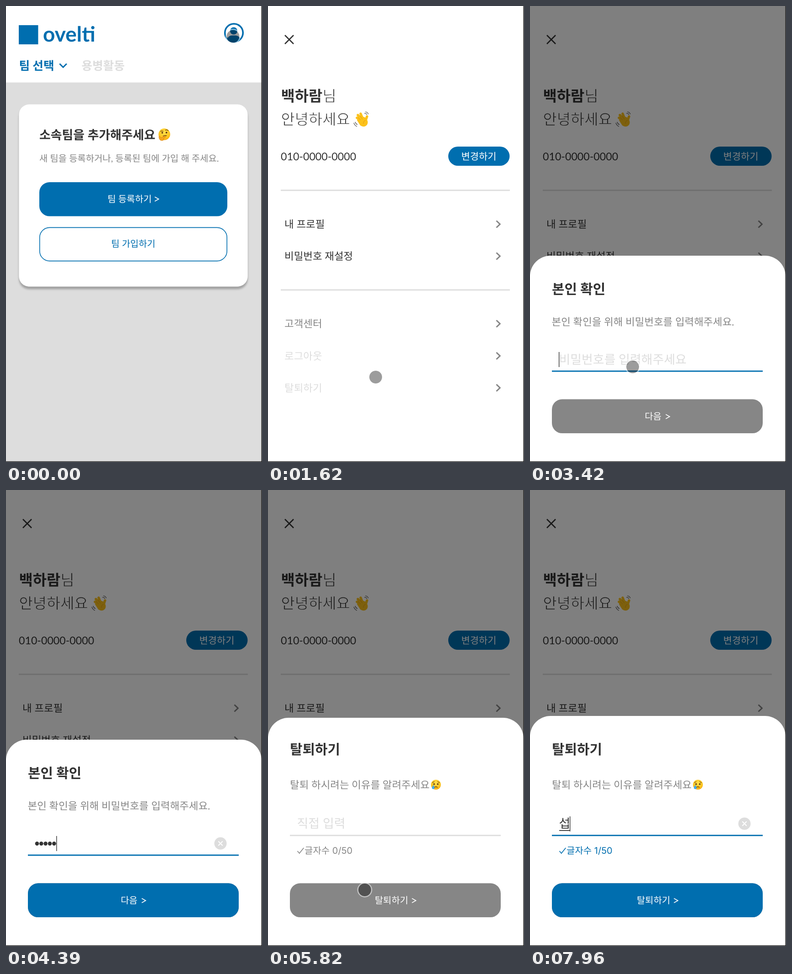
An HTML page that plays this animation: 561 by 999 pixels, repeating every 8000 ms.

```html
<!DOCTYPE html>
<html lang="ko">
<head>
<meta charset="utf-8">
<style>
  html, body { margin: 0; width: 100%; height: 100%; overflow: hidden; background: #fff; }
  svg { display: block; width: 561px; height: 999px; }
  text { font-family: Lato, "Noto Sans CJK KR", "Noto Sans CJK", sans-serif; text-rendering: geometricPrecision; }
  .count { font-family: Inter, "Noto Sans CJK KR", "Noto Sans CJK", sans-serif; }
  .thin { stroke: #fff; stroke-width: .9px; }
  .line { fill: none; stroke-linecap: butt; stroke-linejoin: miter; }
</style>
</head>
<body>
<svg id="stage" viewBox="0 0 561 999" xmlns="http://www.w3.org/2000/svg"></svg>
<script>
const LOOP = 8000;
const BLUE = '#006eaf', DARK = '#333', GREY = '#868686', PALE = '#ddd';

// ---- markup helpers ----
const text = (x, y, size, fill, str, extra = '') =>
  `<text x="${x}" y="${y}" font-size="${size}" fill="${fill}" ${extra}>${str}</text>`;
const rect = (x, y, w, h, fill, rx = 0, extra = '') =>
  `<rect x="${x}" y="${y}" width="${w}" height="${h}" rx="${rx}" fill="${fill}" ${extra}/>`;
const circle = (x, y, r, fill, extra = '') =>
  `<circle cx="${x}" cy="${y}" r="${r}" fill="${fill}" ${extra}/>`;
const line = (d, color, width, extra = '') =>
  `<path class="line" d="${d}" stroke="${color}" stroke-width="${width}" ${extra}/>`;
const group = (id, body) => `<g id="${id}">${body}</g>`;
const BOLD = 'font-weight="700"', THIN = 'class="thin"', MID = 'text-anchor="middle"';
const arrow = (x, y, color) => line(`M${x} ${y - 4.7}l8.6 4.7l-8.6 4.7`, color, 1.6);

// ---- emoji ----
const face = r => circle(0, 0, r, 'url(#sun)');
const thinking = `<g transform="translate(347 281)">${face(12.8)}
  ${circle(-4.5, -3.2, 1.8, '#5b3411')}${circle(4.6, -3.6, 1.8, '#5b3411')}
  ${line('M-8.5 -6.2Q-5.5 -8 -2.2 -6.4M2 -8.6Q5.5 -11 9 -7.8', '#6b3d12', 1.4)}
  ${line('M-3 4.2Q1 1.8 5 3.2', '#6b3d12', 1.5)}
  <path d="M-12 5.5Q-11 2.8 -9.4 5L-8 8L1 4.6Q4 4.6 2 7L-2 9Q0 13.4 -5 13.8Q-11.5 14 -12 5.5Z"
    fill="#f5a623" stroke="#d9820f" stroke-width=".8"/></g>`;
const crying = `<g transform="translate(368 645.5)">${face(10.8)}
  ${circle(-4, -1.2, 1.7, '#5b3411')}${circle(4, -1.2, 1.7, '#5b3411')}
  ${line('M-8 -4.4Q-5 -5 -3.4 -7M8 -4.4Q5 -5 3.4 -7', '#6b3d12', 1.2)}
  ${line('M-3.4 6.4Q0 2.6 3.4 6.4', '#6b3d12', 1.5)}
  <path d="M-5.6 .8Q-9.4 6 -8.6 8.2Q-6 11.4 -3 8.2Q-2.4 6 -5.6 .8Z" fill="#3fa9f0"/></g>`;
const waving = `<g transform="translate(205 249)">
  ${line('M2 4L-10 -4M2 3L-8 -10M4 2L-2 -13M8 5L12 -7', '#fcc21b', 5.4, 'style="stroke-linecap:round"')}
  <path d="M-9 1L2 -6L9 -3Q15 5 11 11Q5 17 -2 12Z" fill="#fcc21b" stroke="#fcc21b" stroke-width="2" stroke-linejoin="round"/>
  ${line('M-8 -5L-2 1M-4 -9L2 -1M4 9Q4 3 9 1', '#e59a12', 1)}
  ${line('M6 -14Q10 -14 12 -11M8 -17Q13 -17 15 -12M-14 5Q-13 9 -9 11M-17 7Q-15 13 -10 15', '#555', 1.2)}</g>`;

// ---- screens ----
const home = rect(0, 0, 561, 999, PALE) + rect(0, 0, 561, 167.5, '#fff') +
  rect(28, 42, 42.5, 42, BLUE) + text(81, 78, 46, BLUE, 'ovelti', BOLD) +
  circle(499.5, 58.8, 19.8, '#fff', `stroke="${BLUE}" stroke-width="3.6"`) +
  circle(499, 54.5, 8, BLUE) +
  `<path d="M485.5 71Q488 65 495 64.6H503Q510.5 65 513 71Q507 78 499.5 78T485.5 71Z" fill="${BLUE}"/>` +
  text(28.5, 139.6, 25.7, BLUE, '팀 선택', BOLD) + line('M117.5 126.5l7.7 7.7l7.7 -7.7', BLUE, 3) +
  text(165.5, 139.6, 25.7, PALE, '용병활동', BOLD) +
  rect(28.5, 215.5, 501, 399, '#fff', 22.4, 'filter="url(#shade)"') +
  text(73, 292, 26.95, DARK, '소속팀을 추가해주세요', BOLD) + thinking +
  text(73, 341.4, 19.95, GREY, '새 팀을 등록하거나, 등록된 팀에 가입 해 주세요.') +
  rect(73, 386, 412, 74.6, BLUE, 22.4) + text(222.5, 429.6, 19.95, '#fff', '팀 등록하기') + arrow(326, 423, '#fff') +
  rect(73.8, 485.4, 410.4, 73.2, '#fff', 21.7, `stroke="${BLUE}" stroke-width="1.6"`) +
  text(279, 528.4, 19.95, BLUE, '팀 가입하기', MID);

const entry = (label, y, color) =>
  text(36, y + 8.4, 22.44, color, label) + line(`M500.5 ${y - 7.5}l7.8 7.5l-7.8 7.5`, GREY, 3);
const menu = rect(0, 0, 561, 999, '#fff') +
  line('M37 64L56 83M56 64L37 83', DARK, 2.6) +
  text(28.5, 209.4, 32.9, DARK, '백하람', BOLD) + text(119.5, 209.4, 32.9, DARK, '님', THIN) +
  text(28.5, 260.2, 32.9, DARK, '안녕하세요', THIN) + waving +
  text(28, 338, 23.2, DARK, '010-0000-0000') +
  rect(395, 308, 134.5, 42, BLUE, 21) + text(462, 336.6, 20.94, '#fff', '변경하기', MID) +
  rect(28, 402.4, 502, 2.8, PALE) + rect(28, 620.6, 502, 2.8, PALE) +
  entry('내 프로필', 478, DARK) + entry('비밀번호 재설정', 548, DARK) +
  entry('고객센터', 696, GREY) + entry('로그아웃', 766.5, PALE) + entry('탈퇴하기', 836.5, PALE);

const panel = (id, top) => rect(0, top, 560, 700, '#fff', 45, `id="${id}"`);
const button = (id, label, x, arrowX) =>
  rect(48, 861.5, 462, 74.6, GREY, 22.4) + rect(48, 861.5, 462, 74.6, BLUE, 22.4, `id="${id}"`) +
  text(x, 906.4, 19.95, '#fff', label) + arrow(arrowX, 899.5, '#fff');
const clear = (id, y) => group(id, circle(470, y, 13.5, PALE) +
  line(`M465.3 ${y - 4.7}l9.4 9.4m0 -9.4l-9.4 9.4`, '#fff', 2));
const caret = (id, y) => rect(63, y, 1.3, 33, '#222', 0, `id="${id}"`);
const dots = Array.from({ length: 9 }, (_, i) => circle(68 + 9.35 * i, 774.6, 4.3, DARK, 'class="dot"')).join('');

const verify = panel('panelA', 547) +
  text(48, 631.4, 29.92, DARK, '본인 확인', BOLD) +
  text(47.5, 699.8, 22.44, GREY, '본인 확인을 위해 비밀번호를 입력해주세요.') +
  text(63.5, 783.6, 26.95, PALE, '비밀번호를 입력해주세요', 'id="hintA"') +
  dots + caret('caretA', 758) + clear('clearA', 774.3) +
  rect(48, 798.6, 462, 2.8, PALE, 0, 'id="ruleA"') + button('goA', '다음', 251.5, 297.5);

const leave = panel('panelB', 495) +
  text(48, 579.4, 29.92, DARK, '탈퇴하기', BOLD) +
  text(48, 653.6, 22.44, GREY, '탈퇴 하시려는 이유를 알려주세요') + crying +
  text(63.5, 740.2, 26.95, PALE, '직접 입력', 'id="hintB"') +
  text(63.5, 740.2, 26.95, DARK, '', 'id="typed"') + rect(64, 745, 23, 1.8, DARK, 0, 'id="compose"') +
  caret('caretB', 715) + clear('clearB', 731) +
  rect(48, 755.4, 462, 2.8, PALE, 0, 'id="ruleB"') +
  group('tally', line('M64.5 791l4.3 5l9.5 -12', 'currentColor', 1.7) +
    text(80, 797.3, 20, 'currentColor', '', 'id="count" class="count"')) +
  button('goB', '탈퇴하기', 234, 315.5);

const $ = id => document.getElementById(id);
$('stage').innerHTML = `<defs>
  <radialGradient id="sun" cx=".5" cy=".35" r=".7"><stop offset="0" stop-color="#ffe14d"/>
    <stop offset=".7" stop-color="#fcc21b"/><stop offset="1" stop-color="#f09a10"/></radialGradient>
  <filter id="shade" x="-10%" y="-10%" width="120%" height="120%">
    <feDropShadow dx="0" dy="6" stdDeviation="2.2" flood-opacity=".27"/></filter></defs>` +
  home + group('menu', menu) + rect(0, 0, 561, 999, '#000', 0, 'id="dim" opacity=".5"') +
  group('verify', verify) + group('leave', leave) +
  group('cursor', circle(0, 0, 14, '#000', 'opacity=".39"') +
    circle(0, 0, 15.2, 'none', 'stroke="#fff" stroke-opacity=".5" stroke-width="2.4"')) +
  rect(559.6, 0, 1.4, 999, '#222') + rect(0, 997.6, 561, 1.4, '#222');

// ---- timing ----
const ramp = (t, a, b) => Math.min(1, Math.max(0, (t - a) / (b - a)));
const outQuart = p => 1 - (1 - p) ** 4;
const smooth = p => p * p * (3 - 2 * p);
const within = (t, a, b) => t >= a && t < b;
const show = (id, on) => { $(id).style.display = on ? '' : 'none'; };
const last = (steps, t) => steps.reduce((value, [at, next]) => t >= at ? next : value, steps[0][1]);

const route = [
  [0, 497.5, 66.5], [850, 497.5, 66.5], [1560, 236, 813], [1700, 236, 813], [2000, 237, 836],
  [2720, 237, 836], [3120, 225, 790.5], [5290, 225, 792], [5420, 214, 858], [5540, 212, 876],
  [5920, 212, 876], [6100, 210, 799], [6440, 208.5, 750.5], [LOOP, 208.5, 750.5]
];
const keys = [[0, 0], [3990, 1], [4120, 2], [4290, 3], [4370, 5], [4450, 6], [4540, 7], [4620, 9]];
const syllable = [[0, ''], [7090, 'ㅅ'], [7180, ''], [7820, 'ㅅ'], [7870, '서'], [7930, '섭']];
const SWAP = 5680;

function moveCursor(t) {
  const i = Math.max(1, route.findIndex(stop => stop[0] > t));
  const [t0, x0, y0] = route[i - 1], [t1, x1, y1] = route[i];
  const p = smooth(ramp(t, t0, t1));
  $('cursor').setAttribute('transform', `translate(${x0 + (x1 - x0) * p} ${y0 + (y1 - y0) * p})`);
  show('cursor', !within(t, 3660, 5060) && t < 7090);
}

function drawVerify(t) {
  const count = last(keys, t);
  show('verify', within(t, 2100, SWAP));
  $('verify').setAttribute('transform', `translate(0 ${452 * (1 - outQuart(ramp(t, 2100, 2468)))})`);
  document.querySelectorAll('.dot').forEach((dot, i) => { dot.style.display = i < count ? '' : 'none'; });
  show('hintA', !count);
  show('clearA', count);
  show('caretA', within(t, 3420, 4890));
  $('caretA').setAttribute('x', 63 + (count ? count * 9.35 + .5 : 0));
  $('ruleA').setAttribute('fill', t >= 3420 ? BLUE : PALE);
  $('goA').setAttribute('opacity', ramp(t, 3970, 4120));
}

function drawLeave(t) {
  const value = last(syllable, t);
  show('leave', t >= SWAP);
  $('panelB').setAttribute('y', 547 - 52 * outQuart(ramp(t, SWAP, SWAP + 300)));
  $('typed').textContent = value;
  show('hintB', !value);
  show('compose', value);
  show('clearB', value);
  show('caretB', t >= 6520 && !within(t, 7590, 7820));
  $('caretB').setAttribute('x', value ? 87 : 63);
  $('ruleB').setAttribute('fill', t >= 6520 ? BLUE : PALE);
  $('tally').style.color = value ? BLUE : GREY;
  $('count').textContent = `글자수 ${value.length}/50`;
  $('goB').setAttribute('opacity', ramp(t, 7080, 7170) - ramp(t, 7180, 7260) + ramp(t, 7810, 7955));
}

function draw(now) {
  const t = now % LOOP;
  show('menu', t >= 490);
  $('menu').setAttribute('transform', `translate(${561 * (1 - outQuart(ramp(t, 470, 840)))} 0)`);
  show('dim', t >= 2115);
  drawVerify(t);
  drawLeave(t);
  moveCursor(t);
}

const start = performance.now();
function tick() {
  draw(performance.now() - start);
  requestAnimationFrame(tick);
}
tick();
</script>
</body>
</html>
```
